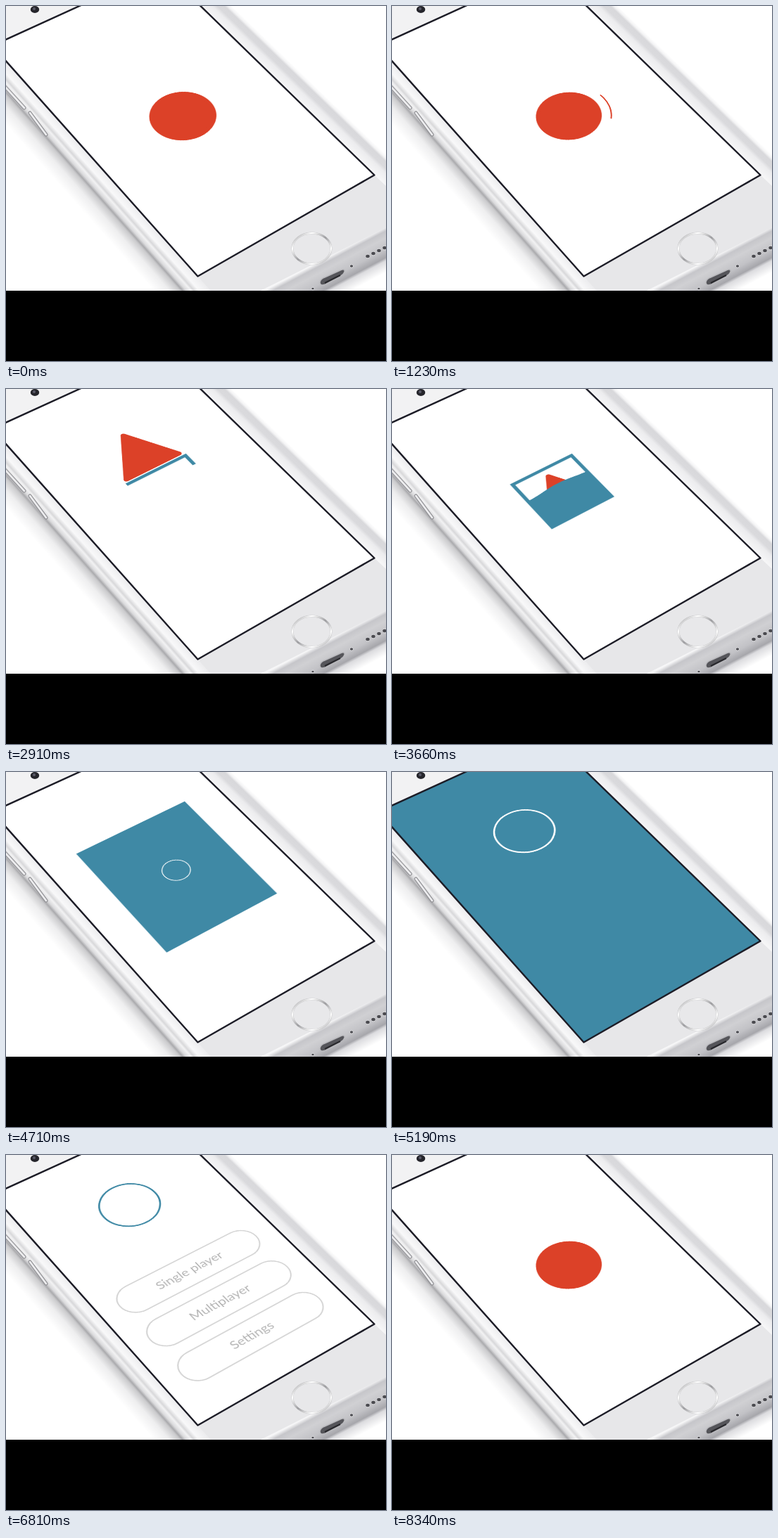
Recreate the animation shown at these times as an HTML page. Size 540 px wide and 505 px high, loop 8370 ms.

```html
<!DOCTYPE html>
<html lang="en">
<head>
<meta charset="utf-8">
<title>Phone loader</title>
<style>
  html, body { margin: 0; width: 100%; height: 100%; overflow: hidden; background: #000; }
  #phone, #bezel { position: absolute; left: 0; top: 0; }
  #screen { position: absolute; left: 0; top: 0; width: 375px; height: 667px; overflow: hidden; transform-origin: 0 0; background: #fff; }
  #screen svg { display: block; }
  text { font: 400 25px Lato, "Open Sans", sans-serif; fill: #b5b5b5; text-anchor: middle; }
  .pill { fill: #fff; stroke: #d3d3d3; stroke-width: 2.4; }
  .arc { fill: none; stroke: #dc4128; stroke-linecap: round; }
</style>
</head>
<body>
<svg id="phone" width="540" height="505">
  <defs>
    <linearGradient id="left" gradientUnits="userSpaceOnUse" x1="136" y1="231" x2="91" y2="271">
      <stop offset="0" stop-color="#ececee"/>
      <stop offset=".2" stop-color="#f8f8f9"/>
      <stop offset=".29" stop-color="#d8d8da"/>
      <stop offset=".34" stop-color="#f2f2f3"/>
      <stop offset=".43" stop-color="#d9d9db"/>
      <stop offset=".49" stop-color="#aaaaad"/>
      <stop offset=".54" stop-color="#cbcbcd"/>
      <stop offset=".72" stop-color="#eeeeef"/>
      <stop offset="1" stop-color="#fff"/>
    </linearGradient>
    <linearGradient id="right" gradientUnits="userSpaceOnUse" x1="400" y1="120" x2="428" y2="91">
      <stop offset="0" stop-color="#f6f6f7"/>
      <stop offset=".3" stop-color="#ececee"/>
      <stop offset=".42" stop-color="#dadadd"/>
      <stop offset=".6" stop-color="#d8d8db"/>
      <stop offset=".68" stop-color="#f4f4f5"/>
      <stop offset=".78" stop-color="#fff"/>
    </linearGradient>
    <linearGradient id="base" gradientUnits="userSpaceOnUse" x1="450" y1="361" x2="477" y2="412">
      <stop offset="0" stop-color="#f6f6f7"/>
      <stop offset=".1" stop-color="#c6c6ca"/>
      <stop offset=".25" stop-color="#d0d0d3"/>
      <stop offset=".5" stop-color="#c2c2c6"/>
      <stop offset=".68" stop-color="#a6a6ab"/>
      <stop offset=".75" stop-color="#dcdcdf"/>
      <stop offset="1" stop-color="#fff"/>
    </linearGradient>
    <linearGradient id="ring" x1="0" y1="0" x2="1" y2="1">
      <stop offset="0" stop-color="#8f8f92"/>
      <stop offset=".25" stop-color="#fff"/>
      <stop offset=".5" stop-color="#9c9c9f"/>
      <stop offset=".75" stop-color="#fff"/>
      <stop offset="1" stop-color="#98989b"/>
    </linearGradient>
    <clipPath id="photo"><path d="M0 0H540V405H0Z"/></clipPath>
  </defs>
  <g clip-path="url(#photo)">
    <path d="M0 0H540V405H0Z" fill="#fff"/>
    <path d="M0 0H103L-20 56L272 384L523 240L540 232V319L362 405H276L0 78Z" fill="#e7e7e9"/>
    <path d="M0 0H103L-2 48Z" fill="#f2f2f3"/>
    <path d="M0 78L272 384L291 405H200L0 180Z" fill="url(#left)"/>
    <path d="M276 0H335L540 200V256L523 240Z" fill="url(#right)"/>
    <path d="M362 405L540 315V405Z" fill="url(#base)"/>
    <g fill="none" stroke-linecap="round">
      <path d="M-4 112L26 145M34 152L57 183" stroke="#8e8e92" stroke-width="5"/>
      <path d="M-4 112L26 145M34 152L57 183" stroke="#ececee" stroke-width="2.8"/>
    </g>
    <path d="M446 393Q447 388 453 386L475 376Q482 373 481 378Q480 382 474 385L454 396Q446 399 446 393Z" fill="#55555a" stroke="#b9b9bd" stroke-width="1.5"/>
    <path d="M453 394L475 383" stroke="#29292d" stroke-width="2"/>
    <g id="holes" fill="#4b4b50" stroke="#dcdcdf"/>
    <ellipse cx="434.5" cy="345" rx="27.5" ry="22" fill="#e8e8ea" stroke="#c4c4c6" stroke-width="3"/>
    <ellipse cx="434.5" cy="345" rx="27.5" ry="22" fill="none" stroke="url(#ring)" stroke-width="2.4"/>
    <ellipse cx="41" cy="5" rx="6.2" ry="5" fill="#25252b"/>
    <circle cx="40" cy="4" r="2" fill="#5a5a68"/>
  </g>
</svg>

<div id="screen">
  <svg width="375" height="667">
    <defs><clipPath id="cut"><path id="cutPath"/></clipPath></defs>
    <g id="menu">
      <circle id="tealRing" cx="191" cy="170" r="56" fill="none" stroke="#3f89a5" stroke-width="3.4"/>
    </g>
    <path id="blob" fill="#dc4128" stroke="#dc4128" stroke-width="8" stroke-linejoin="round"/>
    <path id="arcLow" class="arc"/>
    <path id="arcHigh" class="arc" stroke-width="2.4"/>
    <path id="water" fill="#3f89a5"/>
    <path id="box" d="M122 266H250V394H122Z" fill="none" stroke="#3f89a5" stroke-width="7" pathLength="100"/>
    <path id="sheet" fill="#3f89a5"/>
    <g clip-path="url(#cut)">
      <circle id="whiteRing" r="56" fill="none" stroke="#fff" stroke-width="3.4"/>
    </g>
  </svg>
</div>

<svg id="bezel" width="540" height="405">
  <path id="rim" transform="translate(.5 .5)" fill="none" stroke="#1c1c26" stroke-width="2.4" stroke-linejoin="round"/>
</svg>

<script>
const LOOP = 8370, W = 375, H = 667, NS = 'http://www.w3.org/2000/svg';
const $ = id => document.getElementById(id);
const clamp = v => Math.max(0, Math.min(1, v));
const mix = (a, b, k) => a + (b - a) * k;
const span = (t, a, b) => clamp((t - a) / (b - a));
const smooth = k => k * k * (3 - 2 * k);
const easeIn = k => k * k;
const easeOut = k => 1 - (1 - k) ** 3;
const quad = k => k < .5 ? 2 * k * k : 1 - 2 * (1 - k) ** 2;
const cubic = k => k < .5 ? 4 * k ** 3 : 1 - 4 * (1 - k) ** 3;
const set = (id, attrs) => { for (const k in attrs) $(id).setAttribute(k, attrs[k]); };
const show = (id, on) => { $(id).style.display = on ? '' : 'none'; };

function add(parent, tag, attrs, text = '') {
  const el = document.createElementNS(NS, tag);
  for (const k in attrs) el.setAttribute(k, attrs[k]);
  el.textContent = text;
  return parent.appendChild(el);
}

// Eased value along [time, value] stops
function track(t, stops) {
  let i = 1;
  while (i < stops.length - 1 && t > stops[i][0]) i++;
  const [a, b] = [stops[i - 1], stops[i]];
  return mix(a[1], b[1], smooth(span(t, a[0], b[0])));
}

// Projects the flat screen onto its four corners in the photo
const corners = [[-20, 56], [221, -54], [523, 240], [272, 384]];
function project([[x0, y0], [x1, y1], [x2, y2], [x3, y3]]) {
  const ax = x1 - x2, bx = x3 - x2, sx = x0 - x1 + x2 - x3;
  const ay = y1 - y2, by = y3 - y2, sy = y0 - y1 + y2 - y3;
  const det = ax * by - bx * ay;
  const g = (sx * by - bx * sy) / det, h = (ax * sy - sx * ay) / det;
  const m = [
    (x1 - x0 + g * x1) / W, (y1 - y0 + g * y1) / W, 0, g / W,
    (x3 - x0 + h * x3) / H, (y3 - y0 + h * y3) / H, 0, h / H,
    0, 0, 1, 0, x0, y0, 0, 1];
  return `matrix3d(${m.map(v => v.toFixed(9))})`;
}
$('screen').style.transform = project(corners);
set('rim', { d: 'M' + corners.join('L') + 'Z' });

for (const [cx, cy, r] of [[514, 356, 3.4], [522, 352, 3.4], [530, 348, 3.4], [538, 344, 3.4], [491, 370, 2.6], [436, 402, 2.2]])
  add($('holes'), 'ellipse', { cx, cy, rx: r, ry: r * .85 });

const pills = ['Single player', 'Multiplayer', 'Settings'].map((label, i) => {
  const el = add($('menu'), 'g', {});
  add(el, 'rect', { class: 'pill', x: -147, y: -34, width: 294, height: 68, rx: 34 });
  add(el, 'text', { y: 8 }, label);
  return { el, y: 372.5 + 95 * i, drop: 269 + 100 * i };
});

// Circle that grows three spikes, then settles into a triangle
function blobPath(cx, cy, turn, size, spike, tri) {
  const pts = [];
  for (let a = 0; a < 360; a += 3) {
    const off = Math.abs((a + 60) % 120 - 60);
    const round = 56 + spike * Math.max(0, 1 - off / 24) ** 1.6;
    const flat = 33 / Math.cos((60 - off) * Math.PI / 180);
    const r = size * mix(round, flat, tri), q = (a + turn) * Math.PI / 180;
    pts.push((cx + r * Math.cos(q)).toFixed(2) + ' ' + (cy + r * Math.sin(q)).toFixed(2));
  }
  return 'M' + pts.join('L') + 'Z';
}

function drawBlob(now) {
  const popping = now >= 7830, on = now < 4230 || popping;
  show('blob', on);
  if (!on) return;
  const size = popping
    ? track(now, [[7800, 0], [8190, 1.01], [8340, .98], [8370, 1]])
    : track(now, [[0, 1], [420, .93], [840, .98], [4230, .98]]);
  const t = popping ? 0 : now;
  const tri = smooth(span(t, 2385, 2680));
  const up = easeOut(span(t, 2430, 2850)), down = easeIn(span(t, 3000, 3270));
  const cy = mix(mix(354, 222, up), 352, down);
  const turn = -90 * smooth(span(t, 2400, 2880));
  const spike = 17 * smooth(span(t, 1800, 2370));
  set('blob', {
    d: blobPath(mix(184.5, 186, up), cy, turn, mix(size, 1, tri), spike, tri),
    'stroke-width': mix(8 * Math.min(1, size), 10, tri)
  });
}

function drawArc(id, t, start, end, from, to, r) {
  const k = span(t, start, end);
  show(id, k > 0 && k < 1);
  const at = f => {
    const q = mix(from, to, f) * Math.PI / 180;
    return (184.5 + r * Math.cos(q)) + ' ' + (354 + r * Math.sin(q));
  };
  set(id, { d: `M${at(k ** 2.6)}A${r} ${r} 0 0 1 ${at(easeOut(k))}` });
}

function drawBox(t) {
  const on = t > 2580 && t < 4320;
  show('box', on);
  set('box', { 'stroke-dasharray': `${100 * smooth(span(t, 2580, 3480))} 200` });
  show('water', on && t > 3180);
  const level = mix(396, 262, span(t, 3180, 4230) ** .62);
  let d = 'M122 394';
  for (let x = 122; x <= 250; x += 4) {
    const y = level - 3 * Math.cos((x - 190) / 22 - (t - 3660) / 130);
    d += `L${x} ${Math.max(264, Math.min(394, y)).toFixed(2)}`;
  }
  set('water', { d: d + 'L250 394Z' });
}

function drawSheet(t) {
  const on = t >= 4230 && t < 6420;
  show('sheet', on);
  show('whiteRing', on);
  if (!on) return;
  let d;
  if (t < 5880) {
    const w = mix(135, 400, smooth(span(t, 4280, 5300)));
    const h = mix(135, 720, cubic(span(t, 4280, 5340)));
    d = `M${186 - w / 2} ${330 - h / 2}h${w}v${h}h${-w}Z`;
  } else {
    const edge = mix(720, -100, quad(span(t, 5880, 6420)));
    d = `M0 -300H375V${edge}Q187 ${edge - 54} 0 ${edge}Z`;
  }
  set('sheet', { d });
  set('cutPath', { d });
  const grow = smooth(span(t, 4230, 5250));
  const y = mix(326, 170, smooth(span(t, 4650, 5400)));
  set('whiteRing', { transform: `translate(191 ${y}) scale(${grow})` });
}

function drawMenu(t) {
  const on = t >= 5880 && t < 7560;
  show('menu', on);
  if (!on) return;
  const fade = i => 1 - smooth(span(t, 6810 + i * 90, 7260 + i * 90));
  const rise = quad(span(t, 5880, 6420));
  set('tealRing', { opacity: fade(0) });
  pills.forEach(({ el, y, drop }, i) => {
    el.setAttribute('transform', `translate(186.5 ${y + drop * (1 - rise)})`);
    el.setAttribute('opacity', fade(i));
  });
}

function draw(t) {
  drawBlob(t);
  drawArc('arcLow', t, 960, 2460, -8, 100, 76);
  const thin = span(t, 1800, 2370);
  set('arcLow', { 'stroke-width': mix(2.4, 1.2, thin), opacity: mix(1, .7, thin) });
  drawArc('arcHigh', t, 1800, 2384, 190, 342, 73);
  drawBox(t);
  drawSheet(t);
  drawMenu(t);
}

const begin = performance.now();
function frame() {
  draw((performance.now() - begin) % LOOP);
  requestAnimationFrame(frame);
}
frame();
</script>
</body>
</html>
```
